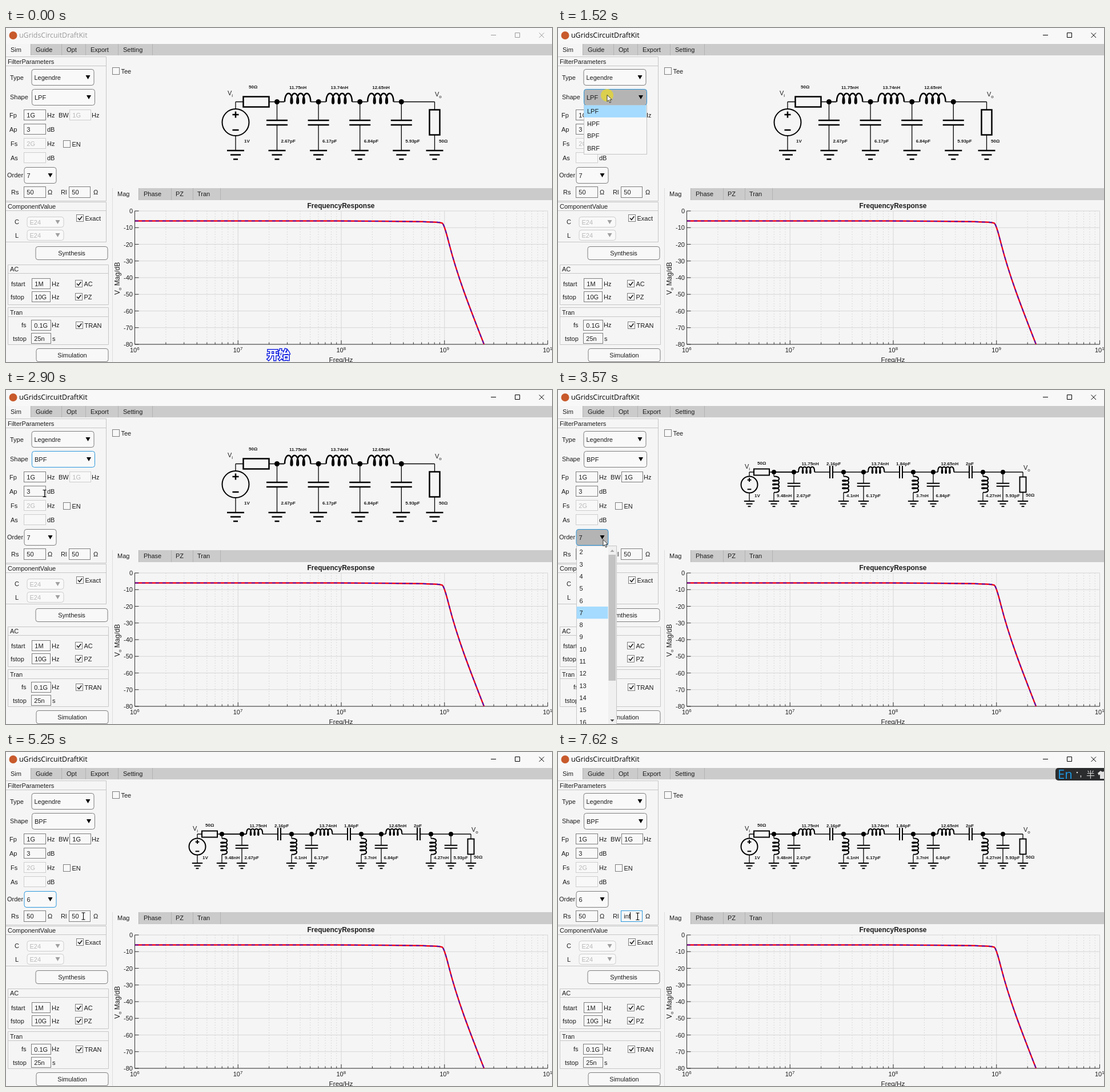
These frames come from a looping animation (956 by 586 pixels, 8000 ms). An HTML page:

```html
<!DOCTYPE html>
<html>
<head>
<meta charset="utf-8">
<style>
html, body { margin: 0; width: 100%; height: 100%; overflow: hidden; background: #f5f5f5; }
svg { display: block; }
text { font: 11px "Liberation Sans", Arial, sans-serif; fill: #1c1c1c; white-space: pre; }
.title { font: 12.4px "Open Sans", "Noto Sans", sans-serif; }
.part { font-size: 8px; font-weight: bold; }
.cjk { font-family: "Noto Sans CJK SC", "Noto Sans CJK", sans-serif; }
</style>
</head>
<body>
<svg width="956" height="586" viewBox="0 0 956 586">
  <g id="base"></g>
  <g id="live"></g>
</svg>
<script>
const LOOP = 8000;
const BG = '#f5f5f5', INK = '#1c1c1c', DIM = '#b9b9b9', EDGE = '#7d7d7d', FOCUS = '#2a96dc';

// Basic shapes
const text = (x, y, s, attrs = '') => `<text x="${x}" y="${y}" ${attrs}>${s}</text>`;
const rect = (x, y, w, h, fill, stroke = 'none', attrs = '') =>
  `<rect x="${x}" y="${y}" width="${w}" height="${h}" fill="${fill}" stroke="${stroke}" ${attrs}/>`;
const path = (d, stroke = INK, width = 1, attrs = '') =>
  `<path d="${d}" fill="none" stroke="${stroke}" stroke-width="${width}" ${attrs}/>`;
const solid = (d, fill) => `<path d="${d}" fill="${fill}"/>`;
const dot = (x, y, r, fill) => `<circle cx="${x}" cy="${y}" r="${r}" fill="${fill}"/>`;
const sub = (s, low, dy = 3) => `${s}<tspan font-size="8" dy="${dy}">${low}</tspan>`;
const tint = c => `style="fill:${c}"`;

// Widgets
const labels = list => list.map(([x, y, s]) => text(x, y, s)).join('');

function field(x, y, w, h, s, on = true, edge = on ? EDGE : '#cdcdcd') {
  return rect(x, y, w, h, '#f8f8f8', edge) + text(x + 4.8, y + h / 2 + 4.3, s, on ? '' : tint(DIM));
}

function combo(x, y, w, h, s, look = 'plain') {
  const off = look === 'off', pressed = look === 'pressed';
  const edge = off ? '#cdcdcd' : look === 'plain' ? EDGE : FOCUS;
  const ax = x + w - 10.5, ay = y + h / 2;
  return rect(x, y, w, h, pressed ? '#b4b4b4' : '#f9f9f9', edge, 'rx="4"') +
    text(x + 4.5, ay + 4.2, s, off ? tint(DIM) : '') +
    solid(`M${ax - 4} ${ay - 3.5}h8l-4 7z`, off ? '#a0a0a0' : '#000');
}

function check(x, y, s, on) {
  return rect(x, y, 12, 12, '#f8f8f8', EDGE) + text(x + 15, y + 10, s) +
    (on ? path(`M${x + 2.5} ${y + 6}l2.8 3 4.5-6`, '#222', 1.7) : '');
}

function button(x, y, s) {
  return rect(x, y, 126, 23, '#f8f8f8', EDGE, 'rx="4"') +
    text(x + 63, y + 15.7, s, 'text-anchor="middle"');
}

function tabs(x0, y, h, right, names, cuts) {
  let s = rect(x0, y, right - x0, h, '#cbcbcb') + rect(x0, y, cuts[0] - x0, h + 1, BG);
  s += cuts.map(x => path(`M${x + .5} ${y}v${h}`, '#b3b3b3')).join('');
  return s + names.map(([x, n]) => text(x, y + 14.3, n)).join('');
}

const rule = d => path(d, '#c6c6c6');

// Circuit parts; k is the drawing scale
const thick = k => k < 1 ? 2 : 2.5;

function coil(x, y, k, turn = 0) {
  const loops = Array(4).fill('c0-19 13-19 13 0').join('c0 4-2.67 4-2.67 0');
  return `<g transform="translate(${x} ${y}) rotate(${turn}) scale(${k})">${path('M0 0' + loops, '#000', thick(k) / k)}</g>`;
}

function ground(x, y, k) {
  const bar = (half, dy) => `M${x - half * k} ${y + dy * k}h${half * 2 * k}`;
  return path(bar(15, 0) + bar(9, 7.6) + bar(4, 15.2), '#000', thick(k));
}

function shuntCap(x, top, bottom, k) {
  const mid = top + 36.5 * k, gap = 4 * k, half = 18.5 * k;
  return path(`M${x} ${top}V${mid - gap}M${x} ${mid + gap}V${bottom}`, '#000', 1.3) +
    path(`M${x - half} ${mid - gap}h${half * 2}M${x - half} ${mid + gap}h${half * 2}`, '#000', thick(k)) +
    ground(x, bottom, k);
}

function source(x, top, bottom, r, k) {
  const mid = top + 36 * k, a = 5.5 * k, d = 13.5 * k;
  return path(`M${x} ${top}V${mid - r}M${x} ${mid + r}V${bottom}`, '#000', 1.3) +
    `<circle cx="${x}" cy="${mid}" r="${r}" fill="none" stroke="#000" stroke-width="2"/>` +
    path(`M${x - a} ${mid - d}h${2 * a}m${-a} ${-a}v${2 * a}M${x - a} ${mid + d}h${2 * a}`, '#000', thick(k)) +
    ground(x, bottom, k);
}

function load(x, top, bottom, k) {
  const y = top + 14 * k;
  return path(`M${x} ${top}V${bottom}`, '#000', 1.3) +
    rect(x - 9 * k, y, 18 * k, 44 * k, BG, '#000', `stroke-width="${thick(k)}"`) + ground(x, bottom, k);
}

const part = (x, y, s) => text(x, y, s, 'class="part"');
const SERIES = ['11.75nH', '13.74nH', '12.65nH'];
const SHUNT = ['2.67pF', '6.17pF', '6.84pF', '5.93pF'];

function lowPass() {
  const y = 129.5, foot = 215, step = 72.6;
  let s = path(`M402 ${y}H487M692 ${y}H750.5`, '#000', 1.3) + source(402, y, foot, 23.5, 1) +
    rect(415.5, 120.5, 45, 18, BG, '#000', 'stroke-width="2.5"') + load(750.5, y, foot, 1);
  SHUNT.forEach((c, i) => {
    const x = 474.5 + i * step;
    s += shuntCap(x, y, foot, 1) + dot(x, y, 4.5, '#000') + part(x + 7, 201, c);
    if (i < 3) {
      s += path(`M${x} ${y}h13M${x + 59} ${y}h13.6`, '#000', 1.3) + coil(x + 13.5, y, 1.03) +
        part(x + 21.5, 107, SERIES[i]);
    }
  });
  return s + part(425, 106, '50Ω') + part(417, 201, '1V') + part(758, 201, '50Ω') +
    text(388, 118, sub('V', 'i')) + text(751, 120, sub('V', 'o'));
}

function bandPass() {
  const y = 144, foot = 195, k = .61, step = 122;
  const caps = ['2.16pF', '1.84pF', '2pF'], coils = ['9.48nH', '4.1nH', '3.7nH', '4.27nH'];
  let s = path(`M335 ${y}H421M744 ${y}H814`, '#000', 1.3) + source(335, y, foot, 14.5, k) +
    rect(343, 138.5, 27, 11, BG, '#000', 'stroke-width="2"') + load(814, y, foot, k);
  SHUNT.forEach((c, i) => {
    const x = 378 + i * step;
    s += path(`M${x} ${y}v7.5M${x} 180V${foot}`, '#000', 1.3) + coil(x, 151.5, .645, 90) + ground(x, foot, k) +
      shuntCap(x + 35, y, foot, k) + dot(x, y, 4, '#000') + dot(x + 35, y, 4, '#000') +
      part(x + 5, 188, coils[i]) + part(x + 39.5, 188, c);
    if (i < 3) {
      s += path(`M${x} ${y}h43M${x + 71} ${y}h27M${x + 103} ${y}h19`, '#000', 1.3) + coil(x + 43, y, .645) +
        path(`M${x + 98} 133v22m5 0v-22`, '#000', 2) +
        part(x + 48.5, 132, SERIES[i]) + part(x + 92, 132, caps[i]);
    }
  });
  return s + part(349, 131, '50Ω') + part(344, 188, '1V') + part(819, 187, '50Ω') +
    text(327, 138, sub('V', 'i')) + text(815, 140, sub('V', 'o'));
}

function chart() {
  const x0 = 225.5, x1 = 948.5, y0 = 321, y1 = 555, dec = (x1 - x0) / 4, dB = (y1 - y0) / 80;
  let major = '', minor = '', ticks = '', s = '';
  for (let i = 0; i <= 8; i++) {
    const y = y0 + i * 10 * dB;
    major += `M${x0} ${y}H${x1}`;
    ticks += `M${x0} ${y}h7`;
    s += text(222, y + 4, i ? -10 * i : 0, 'text-anchor="end"');
  }
  for (let d = 0; d <= 4; d++) {
    const x = x0 + d * dec;
    major += `M${x} ${y0}V${y1}`;
    ticks += `M${x} ${y1}v-7`;
    s += text(x - 8.5, 569, sub('10', d + 6, -4));
    for (let n = 2; n < 10 && d < 4; n++) {
      const m = x + Math.log10(n) * dec;
      minor += `M${m} ${y0}V${y1}`;
      ticks += `M${m} ${y1}v-3.5`;
    }
  }
  const curve = 'M226 338.5H580L660 339 730 339.8C750 341 760 340 764 342.5C768 346 772 364 776 379C790 434 810 486 837 555';
  return path(minor, '#d2d2d2', 1, 'stroke-dasharray="1.5 3"') + path(major, '#d6d6d6') +
    path(ticks + `M${x0} ${y0}V${y1}H${x1}`, '#333') +
    path(curve, '#f00014', 2.4) + path(curve, '#3a10c8', 1.7, 'stroke-dasharray="6 6"') + s +
    text(586.5, 316, 'FrequencyResponse', 'text-anchor="middle" style="font-weight:bold;font-size:12px"') +
    text(586.5, 586, 'Freq/Hz', 'text-anchor="middle" style="font-size:11.8px"') +
    text(0, 0, sub('V', 'o') + '<tspan dy="-3"> Mag/dB</tspan>',
      'transform="translate(199 468) rotate(-90)" style="font-size:12px"');
}

function base() {
  return rect(0, 0, 956, 28, '#f8f8f8') + dot(12.5, 13, 7, '#c85a2c') +
    tabs(0, 28, 20, 956, [[8, 'Sim'], [52, 'Guide'], [106, 'Opt'], [148, 'Export'], [205, 'Setting']], [43, 97, 139, 196, 256]) +
    rule('M0 50.5H175.5V303.5H0M0 66.5H175M0 305.5H175.5V375.5H0M0 320.5H175') +
    rule('M3.5 415.5h176v70h-176zM3.5 430.5h176M3.5 490.5h176v65h-176zM3.5 506.5h176') +
    labels([[3, 63, 'FilterParameters'], [7, 91, 'Type'], [7, 125, 'Shape'], [6, 157, 'Fp'], [72, 157, 'Hz'],
      [92, 157, 'BW'], [150, 157, 'Hz'], [6, 182, 'Ap'], [72, 182, 'dB'], [8, 207, 'Fs'], [72, 207, 'Hz'],
      [8, 232, 'As'], [72, 232, 'dB'], [2, 262, 'Order'], [9, 292, 'Rs'], [73, 292, 'Ω'], [96, 292, 'Rl'], [153, 292, 'Ω'],
      [3, 317, 'ComponentValue'], [15, 344, 'C'], [16, 368, 'L'], [7, 427, 'AC'], [9, 453, 'fstart'], [80, 453, 'Hz'],
      [8, 476, 'fstop'], [80, 476, 'Hz'], [7, 503, 'Tran'], [27, 525, 'fs'], [80, 525, 'Hz'], [12, 549, 'tstop'], [81, 549, 's']]) +
    combo(45, 72.5, 109, 28, 'Legendre') +
    field(31.5, 143.5, 38, 18, '1G') + field(31.5, 168.5, 38, 18, '3') +
    field(31.5, 193.5, 38, 18, '2G', false) + field(31.5, 218.5, 38, 18, '', false) + field(31.5, 278.5, 38, 19, '50') +
    combo(37, 331.5, 64, 18, 'E24', 'off') + combo(37, 354.5, 64, 18, 'E24', 'off') +
    check(100.5, 197.5, 'EN') + check(186.5, 69.5, 'Tee') + check(123.5, 327.5, 'Exact', true) +
    check(121.5, 442.5, 'AC', true) + check(121.5, 465.5, 'PZ', true) + check(122.5, 515.5, 'TRAN', true) +
    field(45.5, 439.5, 32, 18, '1M') + field(45.5, 462.5, 32, 18, '10G') +
    field(44.5, 512.5, 34, 18, '0.1G') + field(44.5, 535.5, 34, 18, '25n') +
    button(52, 383.5, 'Synthesis') + button(53, 562.5, 'Simulation') +
    path('M186.5 281V586', '#dcdcdc') +
    tabs(187, 281, 21, 956, [[195, 'Mag'], [241, 'Phase'], [297, 'PZ'], [335, 'Tran']], [232, 289, 327, 375]) +
    chart();
}

function list(x, y, w, h, rowW, row, items, chosen, hover, pad) {
  let s = rect(x, y, w, h, '#f8f8f8', '#c4c4c4');
  items.forEach((it, i) => {
    const top = y + i * row;
    if (i === chosen) s += rect(x, top, rowW, row, '#a5dbff');
    else if (i === hover) s += rect(x + .5, top + .5, rowW - 1, row - 1, '#dbeffb', '#62aede');
    s += text(x + pad, top + row / 2 + 4.2, it);
  });
  return s;
}

function orderList(hover) {
  const items = Array.from({ length: 15 }, (_, i) => i + 2);
  return list(32.5, 273.5, 70, 330, 55, 21.3, items, 5, hover, 5) +
    rect(88, 274, 14, 312, '#f0f0f0') + rect(88.5, 289, 12.5, 221, '#c2c2c2') +
    solid('M91.5 284h7l-3.5-4z', '#a5a5a5') + solid('M91.5 578h7l-3.5 4z', '#444');
}

function pointer([x, y, kind]) {
  if (kind === 'beam') return path(`M${x - 3} ${y - 6}h2.5l.5 .8 .5-.8h2.5M${x} ${y - 6}v12M${x - 3} ${y + 6}h2.5l.5-.8 .5 .8h2.5`, '#000', 1.1);
  return (kind === 'click' ? dot(x, y + .5, 11, 'rgba(226,212,60,.85)') : '') +
    `<path transform="translate(${x} ${y})" d="M0 0v11.5l2.7-2.5 2 4.6 1.9-.9-2-4.4h3.8z" fill="#fff" stroke="#222" stroke-width=".9"/>`;
}

function inputBar() {
  return rect(871, 28, 95, 22, '#2b2c2e', 'none', 'rx="5"') +
    text(875, 47, 'En', 'style="font:22px \'Open Sans\',sans-serif;fill:#1c9be6"') +
    dot(909, 36, 1.3, '#ddd') + text(913, 43, ',', 'style="font-size:17px;fill:#ddd"') +
    text(925, 44.5, '半', 'class="cjk" style="font-size:15px;fill:#d0d0d0"') +
    solid('M945 37l5-4q3 3 6 1v13h-7v-8l-2 2z', '#e2e2e2');
}

function live(s) {
  const tone = s.active ? '#000' : '#9a9a9a';
  return text(23, 17, 'uGridsCircuitDraftKit', `class="title" ${tint(tone)}`) +
    path('M849 12.5h9M891.5 8.5h8v8h-8zM933.5 8.5l8.5 8.5m0-8.5l-8.5 8.5', tone) +
    (s.band ? bandPass() : lowPass()) +
    combo(45.5, 107.5, 110, 28, s.shape, s.shapeLook) +
    combo(32, 244.5, 56, 28, s.order, s.orderLook) +
    field(111.5, 143.5, 37, 18, '1G', s.band) +
    field(110.5, 278.5, 37, 19, s.load, true, s.typing ? FOCUS : EDGE) +
    (s.caret ? path(`M${s.caret} 281v13`, '#000') : '') +
    (s.open === 'shape' ? list(45.5, 135.5, 110, 86, 109, 21.4, ['LPF', 'HPF', 'BPF', 'BRF'], 0, s.hover, 5.5) : '') +
    (s.open === 'order' ? orderList(s.hover) : '') +
    (s.typing ? inputBar() : '') +
    (s.caption ? text(457, 581, '开始', 'class="cjk" style="font-size:20px;font-weight:bold;fill:#fff;stroke:#1522e0;stroke-width:3px;paint-order:stroke"') : '') +
    (s.at ? pointer(s.at) : '');
}

// Each step changes the state left by the one before it
const STEPS = [
  [0, { caption: true, active: false, band: false, shape: 'LPF', shapeLook: 'plain', order: '7', orderLook: 'plain', load: '50', hover: -1 }],
  [500, { caption: false, at: [138, 86] }],
  [850, { at: [84.5, 120] }],
  [1190, { at: [90, 134] }],
  [1520, { active: true, shapeLook: 'pressed', open: 'shape', at: [86, 117.5, 'click'] }],
  [1850, { shapeLook: 'focus', hover: 1, at: [72, 166] }],
  [2180, { hover: 2, at: [62, 187] }],
  [2510, { open: '', hover: -1, shape: 'BPF' }],
  [2900, { at: [67.5, 181.5, 'beam'] }],
  [3230, { band: true, shapeLook: 'plain', at: [79, 262.5] }],
  [3570, { orderLook: 'pressed', open: 'order' }],
  [3920, { orderLook: 'focus', hover: 0, at: [67, 290] }],
  [4250, { hover: 4, at: [57.5, 364.5] }],
  [4600, { open: '', hover: -1, order: '6' }],
  [4920, { at: [125, 305.5] }],
  [5250, { at: [135.5, 288, 'beam'] }],
  [5590, { orderLook: 'plain', typing: true, caret: 126.5, at: [139.5, 288.5, 'beam'] }],
  [5920, { caret: 0 }],
  [6280, { load: '5' }],
  [6620, { load: '', caret: 115 }],
  [6950, { caret: 0 }],
  [7300, { load: 'in', caret: 123 }],
  [7620, { load: 'inf', caret: 126.5 }]
];
let state = {};
const scenes = STEPS.map(([at, change]) => ({ at, svg: live(state = { ...state, ...change }) }));

const layer = document.getElementById('live');
document.getElementById('base').innerHTML = base();
let shown;
function tick() {
  const t = performance.now() % LOOP;
  const scene = scenes.findLast(s => s.at <= t);
  if (scene !== shown) layer.innerHTML = (shown = scene).svg;
  requestAnimationFrame(tick);
}
tick();
</script>
</body>
</html>
```
